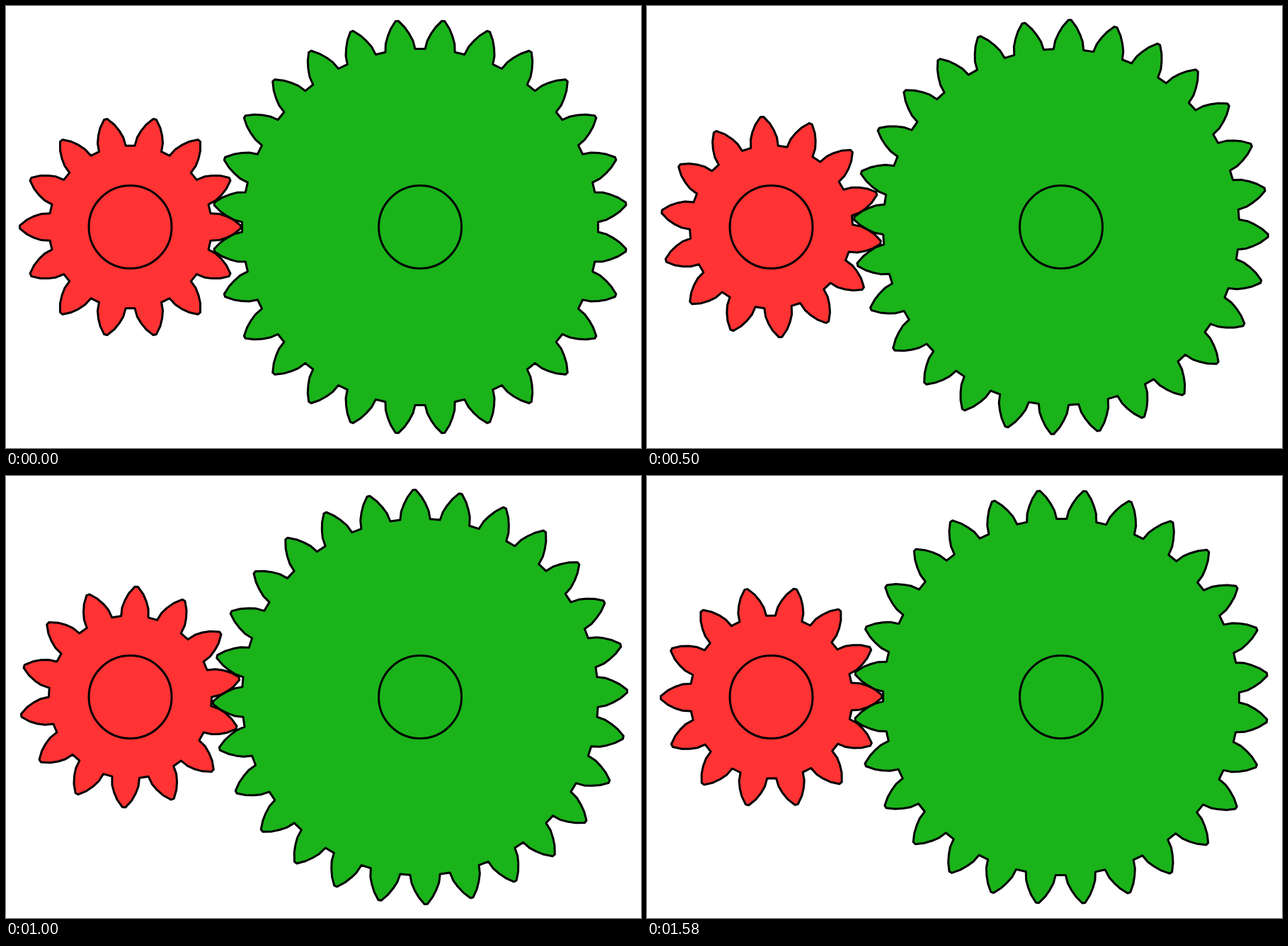
An HTML page with a canvas that plays this animation: 897x624 px, repeating every 1600 ms.

```html
<!DOCTYPE html>
<html lang="en">
<head>
<meta charset="utf-8">
<title>Meshing gears</title>
<style>
html, body { margin: 0; width: 100%; height: 100%; overflow: hidden; background: #fff; }
canvas { display: block; }
</style>
</head>
<body>
<canvas id="stage" width="897" height="624"></canvas>
<script>
const ctx = document.getElementById("stage").getContext("2d");
const LOOP = 1600, STEP = 20, MODULE = 19.5;

// Tooth flank from root to tip: [height in modules, half width as a share of half a pitch]
const FLANK = [[-1.1, 12 / 16], [-0.5, 10.5 / 16], [0, 8 / 16], [0.5, 5 / 16], [1, 1 / 16]];
const TOOTH = [
  ...FLANK.map(([height, width]) => [height, -width]),
  ...FLANK.slice().reverse()
];

function drawGear(x, y, teeth, color, rotation) {
  const halfPitch = Math.PI / teeth;
  const pitchRadius = MODULE * teeth / 2;
  ctx.beginPath();
  for (let i = 0; i < teeth; i++) {
    for (const [height, offset] of TOOTH) {
      const angle = rotation + (2 * i + offset) * halfPitch;
      const radius = pitchRadius + height * MODULE;
      ctx.lineTo(x + radius * Math.cos(angle), y + radius * Math.sin(angle));
    }
  }
  ctx.closePath();
  ctx.fillStyle = color;
  ctx.fill();
  ctx.stroke();

  ctx.beginPath();
  ctx.arc(x, y, 3 * MODULE, 0, 2 * Math.PI);
  ctx.stroke();
}

function draw(now) {
  const time = Math.floor((now % LOOP) / STEP) * STEP;
  const turn = time / LOOP; // in tooth pitches
  ctx.fillStyle = "#fff";
  ctx.fillRect(0, 0, 897, 624);
  ctx.strokeStyle = "#000";
  ctx.lineWidth = 3;
  ctx.lineJoin = "round";
  drawGear(175.5, 312, 14, "#ff3333", turn * 2 * Math.PI / 14);
  drawGear(585, 312, 28, "#1ab31a", (0.5 - turn) * 2 * Math.PI / 28);
}

let start;
function tick(now) {
  start ??= now;
  draw(now - start);
  requestAnimationFrame(tick);
}
draw(0);
requestAnimationFrame(tick);
</script>
</body>
</html>
```
